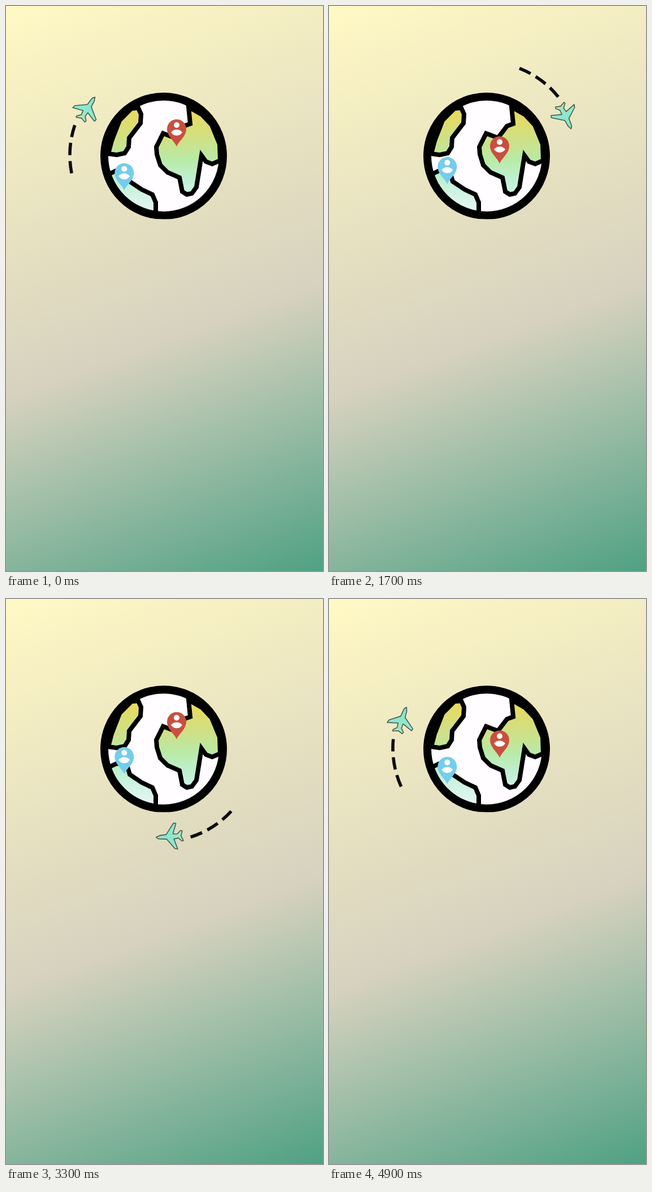
An HTML page for the animation above (5000 ms loop, 561 by 998 pixels).

```html
<!DOCTYPE html>
<html lang="en">
<head>
<meta charset="utf-8">
<title>Around the world</title>
<style>
  html, body { margin: 0; height: 100%; overflow: hidden; }
  body { background: linear-gradient(160deg, #fff9c4 0%, #d7d2bf 57.5%, #4fa184 100%); }
  svg { display: block; width: 100%; height: 100%; }
</style>
</head>
<body>
<svg viewBox="0 0 561 998">
  <defs>
    <linearGradient id="land" gradientUnits="userSpaceOnUse" x1="0" y1="180" x2="0" y2="362">
      <stop offset="0" stop-color="#ecd95a"/>
      <stop offset=".3" stop-color="#cfe085"/>
      <stop offset=".5" stop-color="#b9eaa6"/>
      <stop offset=".7" stop-color="#bff0d4"/>
      <stop offset="1" stop-color="#e6f7f5"/>
    </linearGradient>
    <linearGradient id="body" gradientUnits="userSpaceOnUse" x1="256" y1="0" x2="304" y2="0">
      <stop offset="0" stop-color="#b4e4b4"/>
      <stop offset=".45" stop-color="#8ae8d0"/>
      <stop offset="1" stop-color="#8fe0bd"/>
    </linearGradient>
    <clipPath id="disc"><circle cx="279" cy="265" r="108"/></clipPath>
    <clipPath id="flat"><path d="M160 150H400V376.5H160Z"/></clipPath>
    <g id="pin">
      <path d="M0 48C-4 38 -17 30 -17 17A17 17 0 0 1 17 17C17 30 4 38 0 48Z"/>
      <g fill="#fff">
        <circle cy="10" r="5"/>
        <path d="M-10 23Q-6 18 0 18Q6 18 10 23Q6 28.5 0 28.5Q-6 28.5 -10 23Z"/>
      </g>
    </g>
  </defs>

  <g clip-path="url(#flat)">
    <circle cx="279" cy="265" r="105" fill="#fffdff"/>
    <g clip-path="url(#disc)" fill="url(#land)" stroke="#000" stroke-width="8">
      <path d="M222 181L234 180L239 191L238 207L218 233L217 249L210 260L196 263L181 261L187 238L201 202Z"/>
      <path d="M322 168L326 208L315 212L299 233L278 225L266 249L267 262L273 281L286 294L307 303L312 328L320 333L329 331L337 320L346 264L354 275L365 279L379 273L378 244L364 210L347 192L326 180Z"/>
      <path d="M180 298L195 291L213 290L219 310L240 324L259 333L265 347V372H220L180 330Z"/>
    </g>
    <circle cx="279" cy="265" r="105" fill="none" stroke="#000" stroke-width="14"/>
  </g>

  <use id="red" href="#pin" fill="#c94f40"/>
  <use id="blue" href="#pin" fill="#74cdec"/>

  <g id="flight">
    <path id="trail" fill="none" stroke="#0b0d0d" stroke-width="5.6"/>
    <path fill="url(#body)" stroke="#48594f" stroke-width="1.6" stroke-linejoin="round"
      d="M304 108L301 105L296 104L286 103L273 85L268 83.5L273 102L265 103L259 97L256.5 97.5L260 106.5L257 115L260 116L266 110.5L274 111L267 129L271 130L286 111L297 110.5Z"/>
  </g>
</svg>
<script>
const $ = id => document.getElementById(id);
const LOOP = 5000, STEP = 100, CX = 277.5, CY = 263.5, R = 164.5;

// time in ms, heading of the flight in degrees
const headings = [[0, -59.2], [800, 0], [1300, 35.2], [2200, 98.2],
                  [2800, 140.7], [3800, 208.5], [4900, 287.6]];

function headingAt(t) {
  const i = headings.findIndex(k => k[0] >= t);
  if (i < 1) return headings[0][1];
  const [t0, a0] = headings[i - 1], [t1, a1] = headings[i];
  return a0 + (a1 - a0) * (t - t0) / (t1 - t0);
}

// 0 to 1 and back, halfway between a sine and a triangle wave
function bob(t, period) {
  const phase = (t / period % 1 + 1) % 1;
  const sine = (1 - Math.cos(2 * Math.PI * phase)) / 2;
  return (sine + 1 - Math.abs(2 * phase - 1)) / 2;
}

function arc(mid, half) {
  const at = deg => {
    const a = deg * Math.PI / 180;
    return `${CX + R * Math.cos(a)} ${CY + R * Math.sin(a)}`;
  };
  return `M${at(mid - half)}A${R} ${R} 0 0 1 ${at(mid + half)}`;
}
$('trail').setAttribute('d', [-11.2, 0, 11.2].map(d => arc(243 + d, 3.8)).join(''));

function move(id, x, y) {
  $(id).setAttribute('transform', `translate(${x} ${y})`);
}

function draw(now) {
  const t = Math.floor(now % LOOP / STEP) * STEP;
  move('red', 302, 198 + 35 * bob(t + 167, 3333));
  move('blue', 209.3, 279 - 22 * bob(t + 125, 2500));
  $('flight').setAttribute('transform', `rotate(${headingAt(t)} ${CX} ${CY})`);
}

const start = performance.now();
function tick() {
  draw(performance.now() - start);
  requestAnimationFrame(tick);
}
tick();
</script>
</body>
</html>
```
